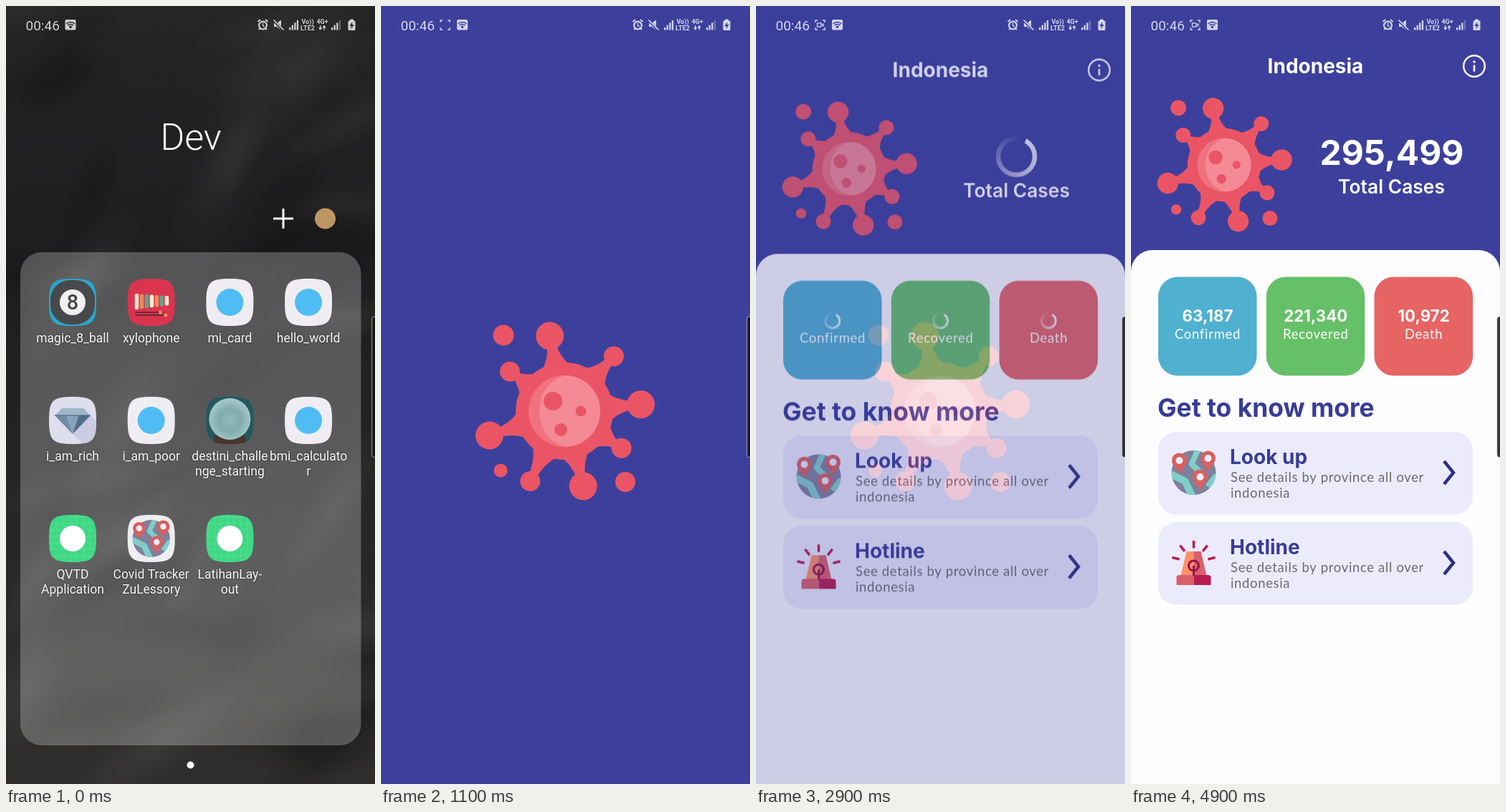
An HTML page with a canvas for the animation above (5000 ms loop, 515x1087 px).

```html
<!DOCTYPE html>
<html lang="en">
<head>
<meta charset="utf-8">
<title>App launch</title>
<style>
  html, body { margin: 0; width: 100%; height: 100%; overflow: hidden; background: #1e1e1f; }
  canvas { display: block; width: 515px; height: 1087px; }
</style>
</head>
<body>
<canvas id="stage" width="515" height="1087"></canvas>
<script>
const W = 515, H = 1087, LOOP = 5000, TAU = Math.PI * 2;
const OPEN = 361, FULL = 800, PAGE = 2655, PAGE_TIME = 300, LOADED = 4000;
const UI = 'Roboto, sans-serif', HEAD = 'Inter, sans-serif', BODY = 'Lato, sans-serif';
const BLUE = '#3c409c', NAVY = '#383c98', CORAL = '#ea5566';
const SIDES = [-1, 1];
let g = document.getElementById('stage').getContext('2d');

const newLayer = () => Object.assign(document.createElement('canvas'), { width: W, height: H }).getContext('2d');
const clamp = v => Math.max(0, Math.min(1, v));
const rad = deg => deg * Math.PI / 180;

function paintOn(ctx, draw) {
  const prev = g;
  g = ctx;
  g.clearRect(0, 0, W, H);
  draw();
  g = prev;
}

function at(x, y, scale, draw) {
  g.save();
  g.translate(x, y);
  g.scale(scale, scale);
  draw();
  g.restore();
}

function disc(x, y, r, fill) {
  g.beginPath();
  g.arc(x, y, r, 0, TAU);
  g.fillStyle = fill;
  g.fill();
}

function ring(x, y, r, width, color, from = 0, to = TAU) {
  g.beginPath();
  g.arc(x, y, r, from, to);
  g.lineWidth = width;
  g.strokeStyle = color;
  g.stroke();
}

function box(x, y, w, h, r, fill) {
  g.beginPath();
  g.roundRect(x, y, w, h, r);
  g.fillStyle = fill;
  g.fill();
}

function trace(pts) {
  g.beginPath();
  pts.forEach(([x, y]) => g.lineTo(x, y));
}

function line(pts, width, color) {
  trace(pts);
  g.lineWidth = width;
  g.strokeStyle = color;
  g.stroke();
}

function poly(pts, fill) {
  trace(pts);
  g.fillStyle = fill;
  g.fill();
}

function text(str, x, y, font, color, align = 'left', spacing = 0) {
  g.font = font;
  g.textAlign = align;
  g.letterSpacing = spacing + 'px';
  g.fillStyle = color;
  g.fillText(str, x, y);
}

function radial(r, ...colors) {
  const grad = g.createRadialGradient(0, 0, 0, 0, 0, r);
  colors.forEach((c, i) => grad.addColorStop(i / (colors.length - 1), c));
  return grad;
}

function bezier(x1, y1, x2, y2) {
  const f = (u, a, b) => 3 * u * (1 - u) * ((1 - u) * a + u * b) + u ** 3;
  return x => {
    let lo = 0, hi = 1;
    for (let i = 0; i < 24; i++) {
      const mid = (lo + hi) / 2;
      if (f(mid, x1, x2) < x) lo = mid; else hi = mid;
    }
    return f(lo, y1, y2);
  };
}
const slideEase = bezier(.4, 0, .2, 1);

function randomizer(seed) {
  return () => (seed = (seed * 16807) % 2147483647) / 2147483647;
}

// ---- launcher ----

// Blurred folds: dark and light streaks, lighter towards the bottom.
function wallpaper() {
  const shade = g.createLinearGradient(0, 0, 0, H);
  ['#252526', '#1d1d1f', '#262626', '#2f2e2d'].forEach((c, i) => shade.addColorStop(i / 3, c));
  g.fillStyle = shade;
  g.fillRect(0, 0, W, H);
  const rnd = randomizer(46);
  for (let i = 0; i < 44; i++) {
    const y = rnd() * H, v = i % 2 ? 12 : 62 + 30 * y / H;
    g.save();
    g.translate(rnd() * W, y);
    g.rotate(-.6 + (rnd() - .5) * 1.4);
    g.scale(80 + rnd() * 90, 25 + rnd() * 25);
    disc(0, 0, 1, radial(1, `rgba(${v},${v},${v},.28)`, `rgba(${v},${v},${v},0)`));
    g.restore();
  }
}

// Rounded icon plate; content is clipped to it.
function plate(fill, content) {
  g.beginPath();
  g.moveTo(33, 0);
  for (let i = 0; i < 4; i++) {
    const c = [1, 0, -1, 0][i], s = [0, 1, 0, -1][i];
    const spin = (x, y) => [x * c - y * s, x * s + y * c];
    g.bezierCurveTo(...spin(33, 28), ...spin(28, 33), ...spin(0, 33));
  }
  g.clip();
  g.fillStyle = fill;
  g.fillRect(-34, -34, 68, 68);
  content();
}

function pin(x, y) {
  const red = '#d9605f';
  poly([[x - 9, y + 5], [x + 9, y + 5], [x, y + 18]], red);
  disc(x, y, 10.5, red);
  disc(x, y, 5, '#e8eefa');
}

function globe() {
  disc(0, 0, 31, '#80809c');
  g.save();
  g.clip();
  g.lineJoin = 'round';
  line([[-32, 2], [-12, 12], [-2, 33]], 10, '#7fcfc8');
  line([[6, -32], [-3, -12], [10, 0]], 8, '#7fcfc8');
  line([[20, 20], [32, 4]], 9, '#7fcfc8');
  g.restore();
  pin(-20, -17);
  pin(20, -20);
  pin(9, 6);
}

const icons = {
  eight() {
    plate('#2ba6cc', () => {
      box(-31, -31, 62, 62, 27, '#48494b');
      disc(0, 0, 18, '#f0f0f0');
      text('8', 0, 10, `500 29px ${UI}`, '#454547', 'center');
    });
  },
  bars() {
    plate('#d9354f', () => {
      const tones = ['#f5e8d0', '#f08a5d', '#5fa38f'];
      for (let i = 0; i < 7; i++) box(-23 + i * 7, -12 + i / 2, 5.5, 22 - i * 1.4, 2, tones[i % 3]);
      for (let i = 0; i < 2; i++) {
        line([[-22, 14 + i * 4], [18, 14 + i * 4]], 1.5, '#4b2330');
        disc(13 + i * 7, 14 + i * 4, 2.5, '#f08a5d');
      }
    });
  },
  blue() { plate('#efedf1', () => disc(0, 0, 19, '#4fbdf3')); },
  green() {
    plate('#3ed884', () => {
      for (let i = -30; i < 34; i += 9) {
        line([[i, -34], [i, 34]], .6, 'rgba(255,255,255,.2)');
        line([[-34, i], [34, i]], .6, 'rgba(255,255,255,.2)');
      }
      disc(0, 0, 18, '#fff');
    });
  },
  gem() {
    plate('#dfdeed', () => {
      const tip = [0, 19];
      poly([[25, -7], [50, 18], [25, 44], tip], '#cbcbe2');
      poly([[-15, -17], [15, -17], [25, -7], [-25, -7]], '#9db6ca');
      ['#6f8ba8', '#87a3bb', '#526c8b'].forEach((c, i) => {
        const x = -25 + i * 50 / 3;
        poly([[x, -7], [x + 50 / 3, -7], tip], c);
      });
      line([[-25, -7], [25, -7]], 1, '#45607d');
    });
  },
  orb() {
    plate('#24585f', () => {
      box(-22, 20, 44, 16, 4, '#4a342d');
      disc(0, -2, 29, radial(31, '#93b9ba', '#7fabad', '#a9cbcb'));
    });
  },
  map() { plate('#efedf1', () => at(0, 0, .84, globe)); }
};

const apps = [
  ['eight', 'magic_8_ball'], ['bars', 'xylophone'], ['blue', 'mi_card'], ['blue', 'hello_world'],
  ['gem', 'i_am_rich'], ['blue', 'i_am_poor'], ['orb', 'destini_challe', 'nge_starting'], ['blue', 'bmi_calculato', 'r'],
  ['green', 'QVTD', 'Application'], ['map', 'Covid Tracker', 'ZuLessory'], ['green', 'LatihanLay-', 'out']
];

function launcher() {
  text('Dev', 258, 201, `300 52px ${UI}`, '#fafafa', 'center');
  line([[373, 297], [401, 297]], 3, '#fafafa');
  line([[387, 283], [387, 311]], 3, '#fafafa');
  disc(445.5, 297, 14.5, '#bf9663');
  box(20, 344, 475.5, 689, 30, 'rgba(255,255,255,.25)');
  apps.forEach(([icon, ...label], i) => {
    const x = 93 + (i % 4) * 109.7, y = 414 + Math.floor(i / 4) * 165;
    at(x, y, 1, icons[icon]);
    g.save();
    g.shadowColor = 'rgba(0,0,0,.4)';
    g.shadowBlur = 3;
    label.forEach((s, n) => text(s, x, y + 56 + n * 20.5, `17.5px ${UI}`, '#f4f4f4', 'center'));
    g.restore();
  });
  disc(257.5, 1060.5, 5, '#fafafa');
}

// ---- app ----

function stalk(length) {
  g.beginPath();
  g.moveTo(61, -21);
  g.quadraticCurveTo(73, -9, length, -6);
  g.lineTo(length, 6);
  g.quadraticCurveTo(73, 9, 61, 21);
  g.fill();
}

// Knobs sit on stalks around the body, big and small in turn.
const knobs = [[-101, 107], [-48, 103], [-5, 107], [33, 95], [76, 108], [116, 109], [162, 110], [216, 94]];

function virus() {
  knobs.forEach(([deg, dist], i) => {
    g.save();
    g.rotate(rad(deg));
    disc(dist, 0, i % 2 ? 14 : 19.5, CORAL);
    stalk(dist - 12);
    g.restore();
  });
  disc(-85, -106, 14.5, CORAL);
  disc(-89, 83, 9.5, CORAL);
  disc(85, 99, 14, CORAL);

  disc(0, 0, 68, CORAL);
  disc(0, 0, 50, '#f0727e');
  g.save();
  g.clip();
  g.beginPath();
  g.ellipse(7.5, 0, 42.5, 50, 0, 0, TAU);
  g.fillStyle = '#f48a95';
  g.fill();
  g.restore();
  disc(-16, -14, 13, CORAL);
  disc(23, 0, 7.5, CORAL);
  disc(-5, 26, 9, CORAL);
}

function splash() {
  g.fillStyle = BLUE;
  g.fillRect(0, 0, W, H);
  at(256, 566, 1, virus);
}

function spinner(x, y, r, width, t) {
  const head = rad(120) - (t - 3400) / 1000 * TAU;
  const fade = g.createConicGradient(head, x, y);
  fade.addColorStop(0, 'rgba(255,255,255,.9)');
  fade.addColorStop(.3, 'rgba(255,255,255,.75)');
  fade.addColorStop(.95, 'rgba(255,255,255,0)');
  ring(x, y, r, width, fade);
}

function siren() {
  const dark = '#b81c50', red = '#d9606a', ink = '#96124a';
  for (let i = -2; i <= 2; i++) {
    const a = rad(-90 + i * 38), ray = r => [r * Math.cos(a), r * Math.sin(a)];
    line([ray(20.5), ray(31)], 3.5, dark);
  }
  poly([[-10, -16], [0, -16], [0, 18], [-18, 18]], '#fe9068');
  poly([[10, -16], [0, -16], [0, 18], [18, 18]], red);
  box(-24, 17, 24, 14, [4, 0, 0, 0], red);
  box(0, 17, 24, 14, [0, 4, 0, 0], dark);
  ring(0, 4, 7, 3, ink);
  line([[0, 4], [0, 18]], 3, ink);
}

function listCard(y, title, drawIcon) {
  box(38, y, 439, 115.5, 25, '#ecebfb');
  at(87.5, y + 57, 1, drawIcon);
  text(title, 138, y + 45, `700 28px ${HEAD}`, NAVY);
  ['See details by province all over', 'indonesia'].forEach((s, i) =>
    text(s, 139, y + 70 + i * 22, `18.5px ${BODY}`, '#6c6b72', 'left', .65));
  line([[437, y + 41], [450, y + 57], [437, y + 73]], 4.5, '#2d3082');
}

const cards = [
  ['Confirmed', '63,187', '#4fb0d0'], ['Recovered', '221,340', '#66c067'], ['Death', '10,972', '#e66463']
];

function home(t) {
  const loaded = t >= LOADED;
  g.fillStyle = BLUE;
  g.fillRect(0, 0, W, H);
  text('Indonesia', 257.5, 94, `700 28px ${HEAD}`, '#fff', 'center');
  ring(479, 84, 14.8, 2.4, '#fff');
  disc(479, 78, 1.7, '#fff');
  line([[479, 82.5], [479, 91.5]], 2.6, '#fff');
  at(130, 222, .752, virus);
  if (loaded) text('295,499', 364, 222, `700 48px ${HEAD}`, '#fff', 'center');
  else spinner(363.5, 205, 25.5, 6.5, t);
  text('Total Cases', 363.5, 262, `600 26.4px ${HEAD}`, '#fff', 'center');

  box(0, 341, W, H - 341, [30, 30, 0, 0], '#fdfcfe');
  cards.forEach(([label, count, color], i) => {
    const x = 38 + i * 150.8, mid = x + 69;
    box(x, 378.5, 137.5, 138, 27, color);
    if (loaded) text(count, mid, 441, `700 22.3px ${HEAD}`, '#fff', 'center');
    else spinner(mid - .3, 434.5, 10, 3, t);
    text(label, mid, 465, `18.5px ${BODY}`, '#fff', 'center', .7);
  });
  text('Get to know more', 37, 574, `700 35.4px ${HEAD}`, NAVY);
  listCard(595, 'Look up', globe);
  listCard(721, 'Hotline', siren);
}

// ---- system overlay ----

function signal(x, bars) {
  for (let i = 0; i < 4; i++) {
    g.globalAlpha = i < bars ? 1 : .35;
    g.fillRect(x + i * 3.6, 30 - i * 3.3, 2.3, 3.5 + i * 3.3);
  }
  g.globalAlpha = 1;
}

function wifiBadge(x, color, ink) {
  box(x - 7.5, 19, 15, 14.5, 2, color);
  for (let r = 2.5; r < 9; r += 3) ring(x, 31, r, 1.5, ink, rad(-135), rad(-45));
  disc(x, 30, 1.3, ink);
}

function recordBadge(color, blink) {
  for (const sx of SIDES) for (const sy of SIDES) {
    line([[sx * 3.5, sy * 6.5], [sx * 6.5, sy * 6.5], [sx * 6.5, sy * 3.5]], 1.4, color);
  }
  if (blink) return;
  g.lineWidth = 1.3;
  g.strokeRect(-4, -2.5, 5.5, 5);
  poly([[2, 0], [5, -2.7], [5, 2.7]], color);
}

function alarm(color) {
  ring(0, 0, 5.4, 2.2, color);
  line([[0, -3.5], [0, .5], [2.5, 2]], 1.4, color);
  for (const s of SIDES) {
    line([[s * 7, -5], [s * 3.5, -8]], 2, color);
    line([[s * 5.5, 6], [s * 3.5, 4]], 1.8, color);
  }
}

function muted(color, ink) {
  poly([[-6, -2.5], [-2, -2.5], [4, -7], [4, 7], [-2, 2.5], [-6, 2.5]], color);
  line([[-7, -7], [7, 7.5]], 3.6, ink);
  line([[-6.5, -7], [7.5, 7]], 1.7, color);
}

function battery(color, ink) {
  box(-2.5, -8, 5, 3, 1, color);
  box(-5, -6, 10, 13.5, 1.5, color);
  poly([[1, -4.5], [-3.2, 1.5], [-.5, 1.5], [-1.2, 6], [3.2, -.5], [.5, -.5]], ink);
}

function statusBar(t, ink) {
  const c = 'rgba(255,255,255,.78)', small = `700 9px ${UI}`;
  const recording = t >= 200;
  text('00:46', 27.5, 33.5, `19px ${UI}`, c);
  if (recording) at(89.5, 26.5, 1, () => recordBadge(c, t % 1000 < 500));
  wifiBadge(recording ? 113.5 : 90, c, ink);
  at(358.5, 27, 1, () => alarm(c));
  at(380, 26.5, 1, () => muted(c, ink));
  g.fillStyle = c;
  signal(395, 4);
  signal(454, 3);
  text('Vo))', 421, 25, small, c, 'center');
  text('LTE2', 421, 33.5, small, c, 'center');
  text('4G+', 441.5, 25, small, c, 'center');
  for (const s of SIDES) {
    const x = 441.4 - s * 2.7, y = 30.3;
    line([[x, y - s * 3.3], [x, y + s]], 1.4, c);
    poly([[x - 2.7, y], [x + 2.7, y], [x, y + s * 3.5]], c);
  }
  at(482.5, 26.5, 1, () => battery(c, ink));
}

function edgeHandle() {
  box(510.8, 433.8, 12, 197, 4, 'rgba(16,16,16,.84)');
  g.lineWidth = 1;
  g.strokeStyle = 'rgba(255,255,255,.6)';
  g.stroke();
}

// ---- timeline ----

const wallLayer = newLayer(), menuLayer = newLayer(), homeLayer = newLayer();

// The window grows from the tapped icon; rest runs from 1 to 0.
function appWindow(t, rest) {
  const x = 161 * rest, y = 754 * rest;
  const w = W - 265 * rest - x, h = H - 329 * rest - y;
  const r = Math.min(36, rest * 1200) + 56 * rest;
  g.save();
  g.beginPath();
  g.roundRect(x, y, w, h, Math.min(w / 2, h / 2, r));
  g.clip();
  g.translate(x, y);
  g.scale(w / W, h / H);
  if (t < 500) {
    g.fillStyle = '#faf9fd';
    g.fillRect(0, 0, W, H);
  } else splash();
  g.restore();
}

function launchScene(t) {
  const rest = Math.exp(-Math.max(0, t - OPEN) / 69.3), open = 1 - rest;
  paintOn(menuLayer, launcher);
  g.drawImage(wallLayer.canvas, 0, 0);
  at(203, 744, 1 - .053 * open, () => {
    g.globalAlpha = 1 - .88 * open;
    g.drawImage(menuLayer.canvas, -203, -744);
  });
  if (open > 0) appWindow(t, rest);
}

function appScene(t) {
  const p = clamp((t - PAGE) / PAGE_TIME);
  if (p < 1) splash();
  if (p === 0) return;
  paintOn(homeLayer, () => home(t));
  g.globalAlpha = p ** 1.4;
  g.drawImage(homeLayer.canvas, 0, H / 4 * (1 - slideEase(p)));
  g.globalAlpha = 1;
}

function render(t) {
  if (t < FULL) launchScene(t);
  else appScene(t);
  statusBar(t, t < 600 ? '#29292a' : BLUE);
  edgeHandle();
}

paintOn(wallLayer, wallpaper);
const start = performance.now();
function tick() {
  render((performance.now() - start) % LOOP);
  requestAnimationFrame(tick);
}
tick();
</script>
</body>
</html>
```
